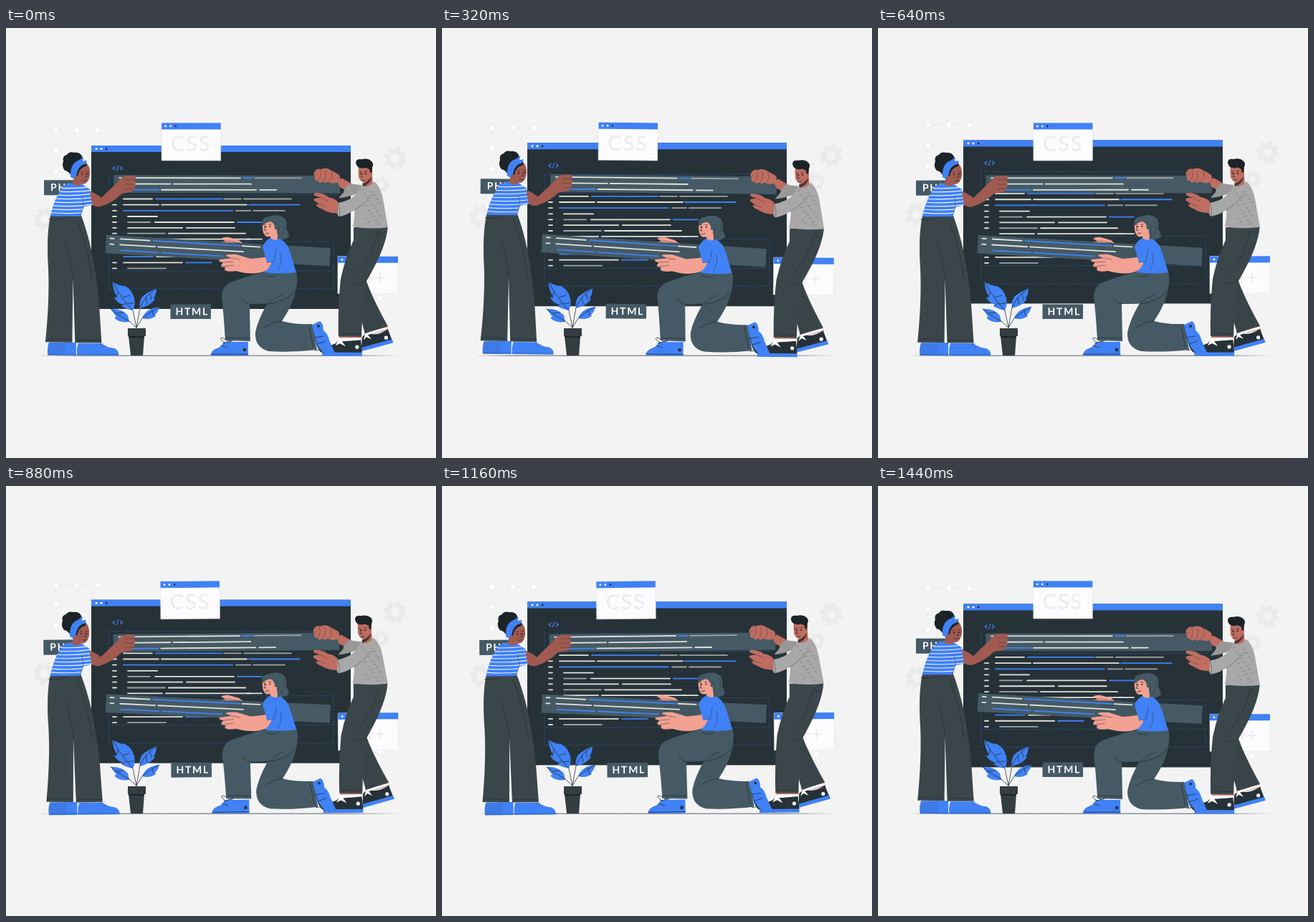
Animation of 600x600 px, one loop 1480 ms. Source, as an HTML page:

```html
<!DOCTYPE html>
<html lang="en">
<head>
<meta charset="utf-8">
<style>
html, body { margin: 0; height: 100%; overflow: hidden; background: #f3f3f3; }
svg { display: block; width: 100vw; height: 100vh; }
text { font-family: Lato, sans-serif; }
.blue { fill: #4081f5; }
.dark { fill: #263238; }
.slate { fill: #455a64; }
.pants { fill: #3b464b; }
.brown { fill: #a05a50; }
.tan { fill: #bf6d60; }
.pink { fill: #f2a192; }
.line { fill: none; stroke: #263238; stroke-width: .8; stroke-linecap: round; stroke-linejoin: round; }
.code { stroke-width: 1.8; stroke-linecap: round; }
.dash { fill: none; stroke: #4081f5; stroke-width: .8; stroke-dasharray: 2.2 2; opacity: .5; }
.tag { fill: #fff; font-weight: 700; font-size: 14px; letter-spacing: 1.7px; }
.ghost { fill: #ebebef; font-size: 29px; letter-spacing: 1.8px; }
</style>
</head>
<body>
<svg viewBox="0 0 600 600">
<defs>
  <clipPath id="shirt"><path d="M80 220Q94 214 106 218L118 226L121 247L108 250L104 263H62Q66 240 80 220Z"/></clipPath>
  <linearGradient id="fade"><stop offset="0" stop-color="#263238" stop-opacity=".1"/><stop offset=".1" stop-color="#263238"/><stop offset=".85" stop-color="#263238"/><stop offset="1" stop-color="#263238" stop-opacity="0"/></linearGradient>
  <g id="gear" fill="none" stroke="#eaeaea">
    <circle r="9.500" stroke-width="6.500"/>
    <circle r="14" stroke-width="4.500" stroke-dasharray="6 5"/>
  </g>
</defs>

<g id="back">
  <use href="#gear" x="543" y="181.500"/>
  <use href="#gear" transform="translate(523 218.500) scale(.72)"/>
  <use href="#gear" x="54" y="267"/>
  <path d="M70 200V143H128M522 345V377H500" fill="none" stroke="#ededed" stroke-width=".7"/>
  <g id="knobs" fill="#fff" stroke="#e9e9e9" stroke-width=".7"></g>
  <path class="dark" d="M119 164H481V392H119Z"/>
  <path class="blue" d="M119 164H481V173H119Z"/>
  <circle cx="126" cy="168.500" r="1.500" fill="#fff"/><circle cx="133" cy="168.500" r="1.500" fill="#fff"/><circle cx="140" cy="168.500" r="1.500" class="dark"/>
  <path d="M152.500 193L149 195.700L152.500 198.400M158.800 193L162.300 195.700L158.800 198.400M156.700 192L154.600 199.400" fill="none" stroke="#4081f5" stroke-width="1.200"/>
  <path class="dash" d="M143.500 208H460V233H143.500ZM143.500 298H457V364H143.500ZM143.500 339H457"/>
  <g id="page" class="code"></g>
</g>

<path d="M48 456.700H552V457.600H48Z" fill="url(#fade)"/>

<g id="front">
  <!-- floating windows and tags -->
  <g>
    <path d="M217 132.500H299.500V185H217Z" fill="#fcfcfe" stroke="#e4e4e4" stroke-width=".6"/>
    <path class="blue" d="M217 132.500H299.500V141.500H217Z"/>
    <circle cx="222.500" cy="137" r="1.400" fill="#fff"/><circle cx="229.500" cy="137" r="1.400" fill="#fff"/><circle cx="236.500" cy="137" r="1.400" class="dark"/>
    <text class="ghost" x="230" y="171.500">CSS</text>
    <path d="M463 318.500H547V370.500H463Z" fill="#fcfcfe" stroke="#e4e4e4" stroke-width=".6"/>
    <path class="blue" d="M463 318.500H547V327.500H463Z"/>
    <circle cx="469" cy="323" r="1.400" fill="#fff"/>
    <text class="ghost" x="482" y="357" style="font-size:26px;letter-spacing:0">C++</text>
    <path class="slate" d="M53 212.500H105V233.500H53ZM229.500 385.500H286V406H229.500Z"/>
    <text class="tag" x="62" y="227.500">PHP</text>
    <text class="tag" x="236.500" y="400.500">HTML</text>
  </g>

  <!-- code strips -->
  <path class="slate" d="M150.500 205.500L466 206V230.500L150.500 230Z"/>
  <g id="strip" class="code"></g>
  <g transform="translate(140 289) rotate(3.250)">
    <path class="slate" d="M0 0H313.500V25.500H0Z"/>
    <path d="M170 0H250V25.500H170Z" class="dark" opacity=".1"/>
    <g id="slab" class="code"></g>
  </g>

  <!-- standing woman -->
  <g>
    <path class="blue" d="M60 439H98V457H58.500Q57 447 60 439Z"/>
    <path class="dark" opacity=".08" d="M60 439H83V457H58.500Q57 447 60 439Z"/>
    <path class="blue" d="M101 440H133Q140 446 151 447Q158 450 157 457H99.500Q98 448 101 440Z"/>
    <path class="line" opacity=".35" d="M59 455.500H157M130 442L136 440M134 445L140 443"/>
    <path class="pants" d="M62 262H105Q113 283 119 310Q127 350 130 385L133.500 439.500H96.500L93.500 350L92.500 439L55 438.500Q61 380 59 335Q56 290 62 262Z"/>
    <path class="line" d="M82 300Q92 325 93.500 350M60 267Q74 269 84 265M99 268Q113 300 120 350M58 434L91 435M98 435.500L133 436"/>
    <path class="blue" d="M80 220Q94 214 106 218L118 226L121 247L108 250L104 263H62Q66 240 80 220Z"/>
    <path id="stripes" clip-path="url(#shirt)" fill="none" stroke="#f0f4ff" stroke-width="1.100"/>
    <path class="line" opacity=".5" d="M106 235Q109 243 108 250L104 263"/>
    <path class="brown" d="M95 206L93 218Q99 223 106 218V210Z"/>
    <path class="brown" d="M117 228Q126 231 133 237L157 214Q160 208 168 206L179 206Q183 209 179 212Q183 214 180 218Q182 222 178 224Q178 229 173 229L162 231Q150 243 133 249Q124 251 120 246Z"/>
    <path class="line" opacity=".5" d="M179 212H167M180 218H167M178 224H167"/>
    <path d="M82 199Q77 193 80 186Q78 179 85 177Q88 172 95 174Q103 173 106 179Q108 184 104 189L95 203L91 207Q88 200 82 199Z" fill="#1c2427"/>
    <path class="brown" d="M98 197Q103 189 112 189Q118 194 117 206Q115 217 108 218Q99 218 96 208Z"/>
    <path d="M96 207Q95 195 104 190L112 188Q114 193 109 194Q101 197 100 208Z" fill="#1c2427"/>
    <path class="blue" d="M90 208Q89 193 97 187Q104 184 108 180L107 186L113 185L111 190Q100 192 98 207L95 211Z"/>
    <circle class="brown" cx="98.500" cy="209" r="2.800"/>
    <path class="line" d="M104 201.500H107M112 200.500H115M111 203L113 208L110 208.500M107.500 213Q110 214 113 212.500"/>
    <circle cx="106" cy="204.500" r=".9"/><circle cx="114" cy="204" r=".8"/>
  </g>

  <!-- man -->
  <g>
    <path class="tan" d="M462 214L468 209L486 219L480 229L466 222Z"/>
    <path d="M497 219L479 217Q472 222 471 229L464 237Q478 236 492 230Z" fill="#989898"/>
    <path class="tan" d="M431 200Q434 195 440 197Q446 194 453 198L464 204Q468 208 464 214Q458 219 449 214Q446 218 442 214Q438 218 435 213Q430 214 431 208Q428 204 431 200Z"/>
    <path class="line" opacity=".5" d="M438 198Q441 205 437 212M446 199Q448 206 444 213M431 206L434 204M454 200Q457 209 452 213"/>
    <path class="tan" d="M498 211V221Q505 226 512 217L511 206Z"/>
    <!-- back leg and shoe -->
    <path d="M500 422L531 414L534 421L501 429Z" class="tan"/>
    <path class="dark" d="M497 431L504 425Q517 431 533 420L539 436L496 447Z"/>
    <path class="blue" d="M495 446L539 434L540.500 439L496 451Z"/>
    <path d="M502 424L532 417L533 420L505 428L510 434L503 431L499 435Z" fill="#fff"/>
    <circle cx="530.500" cy="432" r="2.600" fill="#fff"/>
    <path class="pants" d="M486 278H532.500Q530 306 503 353Q511 376 533 416L501 426L482 358Z"/>
    <path d="M503 353Q512 380 526 412L501 426L496 370Z" class="dark" opacity=".1"/>
    <!-- front leg and shoe -->
    <path d="M465 429H496V435H465Z" class="tan"/>
    <path class="dark" d="M460 440L466 433Q482 439 495 433L497 453H443Q447 444 460 440Z"/>
    <path class="blue" d="M442 452.500H497V457.500H441Z"/>
    <path d="M465 432H496V435L469 437L474 444L466 440L460 443Z" fill="#fff"/>
    <circle cx="490" cy="445" r="2.600" fill="#fff"/>
    <path class="pants" d="M485 278H532.500Q530 308 503 352Q497 390 496 430.500L464 430Q463 388 467 350Q474 318 485 296Z"/>
    <path class="line" d="M503 352Q493 358 487 356M519 284Q512 318 489 344M466 426L496 427M520 284Q522 290 528 291"/>
    <!-- jumper, near arm, head -->
    <path d="M497 220Q506 224 514 214Q523 222 526 238L533 278Q508 281 484 277Q487 262 486 254Q476 261 464 263Q457 252 463 244Q479 241 487 233Z" fill="#a8a8a8"/>
    <path id="spots" fill="none" stroke="#8f8f8f" stroke-width="1.500" stroke-linecap="round"/>
    <path class="line" opacity=".5" d="M486 254Q500 246 511 232M463 244Q467 252 465 262"/>
    <path class="tan" d="M463 242Q456 236 450 236Q444 230 431 230Q427 233 434 235L440 237Q430 236 429 240L437 246L433 246Q433 250 440 252Q450 259 463 258Z"/>
    <path class="line" opacity=".5" d="M440 237L450 242M437 246L446 249"/>
    <path class="tan" d="M491.500 195Q500 190 511 195Q512 209 506 215Q496 218 492 208Z"/>
    <path d="M488 188Q488 182 496 183Q505 181 509 185Q514 188 511 194L510 203L508 203L507 197L502 194.500Q490 198 488 188Z" fill="#1c2427"/>
    <path d="M497 217Q504 216 510 207Q510 217 498 221Z" fill="#1c2427" opacity=".75"/>
    <circle class="tan" cx="509" cy="204" r="2.400"/>
    <path class="line" d="M493 200.500H496M500 200.500L504 199.500M497 203L495 208H498M496 212Q499 213 501 212"/>
    <circle cx="495.500" cy="203" r=".9"/><circle cx="502" cy="203" r=".9"/>
  </g>

  <!-- kneeling woman -->
  <g>
    <path class="pink" d="M300 294Q304 291 311 292L325 296L330 300L300 299L306 297Z"/>
    <path class="line" opacity=".6" d="M302 299L310 297L327 300"/>
    <path class="blue" d="M425 415L438 409Q443 412 443 422Q449 426 451 435L459 453L455 457H446L434 445Z"/>
    <path d="M427 420L437 449L431 450M430 432L443 430M434 441L446 437" class="line"/>
    <path class="dark" d="M438 451L434 442L444 455Z"/>
    <circle cx="436" cy="416" r="2" class="dark"/>
    <path class="slate" d="M406 342Q409 374 385 409Q404 414 427 413L434 449Q398 453 367 451Q347 446 348 425Q351 408 365 384L376 355Z"/>
    <path d="M365 384Q390 383 403 364Q398 389 385 409Q370 410 354 407Z" class="dark" opacity=".08"/>
    <path class="blue" d="M304 438H338V457H286Q286 450 294 447Q301 445 304 438Z"/>
    <path class="line" d="M286 455H338M300 443L309 446M303 440L315 436M304 438Q296 433 302 432L312 438L321 434"/>
    <circle cx="333" cy="449" r="2.400" class="dark"/>
    <path class="slate" d="M362 340H405Q410 360 393 376Q374 386 340 385L341 437L306 436Q304 400 301 375Q302 358 316 354Q341 345 362 340Z"/>
    <path class="line" d="M340 385Q333 384 329 377M404 367Q390 382 366 385Q374 376 386 372M362 345Q375 350 380 343M307 432L340 433M385 409Q370 411 360 418M423 416L429 446"/>
    <path class="slate" d="M358 274Q356 264 367 263Q380 258 389 266Q393 272 391 281Q395 286 395 291Q388 297 377 295Q368 290 367 275Z"/>
    <path class="pink" d="M369 287V296Q374 300 379 295L379 283Z"/>
    <path class="blue" d="M369 293Q375 298 382 294Q393 299 397 315L405 341Q384 344 361 341L367 322L358 305Q362 296 369 293Z"/>
    <path class="pink" d="M372 318Q357 321 341 322L322 316Q306 315 307 318L315 321L298 323Q295 326 303 327L300 331Q300 334 306 334L305 337Q307 341 321 339Q345 346 362 339Q371 333 372 318Z"/>
    <path class="line" opacity=".6" d="M303 327L317 326M302 333L317 331M315 321L326 323"/>
    <path class="blue" d="M361 303Q372 298 377 309L374 326L364 327Q361 315 358 306Z"/>
    <path class="line" opacity=".55" d="M377 309L374 326L364 327M383 315Q386 329 379 338"/>
    <path class="pink" d="M358 274Q364 267 376 270Q381 279 377 287Q371 292 363 291Q357 287 358 274Z"/>
    <path class="slate" d="M357 276Q360 263 373 263Q389 264 389 278Q391 292 379 293Q379 283 375 281Q376 273 369 270Q363 271 357 276Z"/>
    <path d="M388 270Q392 284 379 294M376 272Q383 277 380 288" class="line" opacity=".5"/>
    <circle class="pink" cx="376" cy="283" r="2.200"/>
    <path class="line" d="M359 274.500L362 274M367 274L370 274M363 277L360 282L363 282.500M362 287Q364 287.500 367 286"/>
    <circle cx="361.500" cy="277" r=".9"/><circle cx="368.500" cy="277" r=".9"/>
  </g>
</g>

<!-- plant -->
<g>
  <path class="blue" d="M148.500 354Q158 360 166 360Q176 365 179 377Q181 387 177 394Q167 392 161 388L163 386Q154 383 151 376L155 375Q149 366 148.500 354ZM210 363Q210 372 206 377L208 378Q203 387 187 391Q185 383 190 375Q197 369 210 363ZM146 392Q162 391 170 401L172 410Q157 412 151 404L154 403ZM214 389Q212 397 208 400L209 402Q201 408 190 405Q195 391 214 389Z"/>
  <path d="M177 394Q182 405 182 419Q182 402 187 390M172 409Q180 411 182 419Q184 409 190 405" fill="none" stroke="#f8f8f8" stroke-width="1.200"/>
  <path class="line" d="M149 354Q160 377 177 394L182 418M156 368L154 377M163 376L173 373M168 383L162 388M169 385L178 384M210 363Q194 374 187 390L182 418M201 370L203 379M195 376L197 385M146 392Q157 402 172 409L182 418M155 398L164 397M214 389Q202 395 190 405L182 418M204 394L206 401"/>
  <path fill="#343d41" d="M170 419H195V430H193L191 457H174L171 430H170Z"/>
  <path d="M171 430H193V432H171Z" fill="#1c2427"/>
</g>
</svg>

<script>
const el = id => document.getElementById(id);
const colors = { w: "#e2e2dc", g: "#a0a3a2", b: "#4081f5" };

// Each row reads "y: <colour><from>-<to> ..."
function drawCode(id, rows) {
  for (const row of rows) {
    const [y, parts] = row.split(":");
    for (const part of parts.trim().split(" ")) {
      const [from, to] = part.slice(1).split("-");
      el(id).innerHTML += `<path d="M${from} ${y}H${to}" stroke="${colors[part[0]]}"/>`;
    }
  }
}

drawCode("page", [
  "238.5: w164-204 b209-301 g304-328 g332-398",
  "246.7: w149-154 w164-213 w217-336 b339-410",
  "254.9: w149-154 b164-316 g321-341 g345-389",
  "263: w149-154 w170-211",
  "271: w149-154 g170-201 w208-318 b323-357",
  "278.8: w149-154 w170-246 w252-319",
  "286.7: w149-154 g170-222 w227-334",
  "294.6: w170-218 w223-341 w336-357",
  "319.2: b164-205 w210-240",
  "327.3: w149-154 w164-246 b251-287",
  "335.4: w149-154 g170-223"
]);
drawCode("strip", [
  "209.3: w158-327 b331-344 g347-412",
  "217.6: w166-230 w234-342",
  "225.8: b172-213 w217-349 w354-377"
]);
drawCode("slab", [
  "4.3: w6-11 w20-61 b66-187 w190-215",
  "12.3: w6-11 w20-69 w73-192",
  "20.2: b22-74 b79-163"
]);

for (const [x, y] of [[70, 143], [99, 143], [128, 143], [70, 171], [70, 200], [522, 377]])
  el("knobs").innerHTML += `<path d="M${x - 3.3} ${y - 3.3}h6.6v6.6h-6.6z"/>`;

let stripes = "", spots = "";
for (let y = 222; y < 262; y += 5) stripes += `M55 ${y}Q90 ${y + 4} 125 ${y - 1}`;
for (let i = 0; i < 20; i++) {
  const y = 226 + i * 2.5, x = 496 + i * 0.3 + i * 13 % 23;
  spots += `M${x} ${y}l${2 + i % 2} ${i % 3 - 1}`;
}
el("stripes").setAttribute("d", stripes);
el("spots").setAttribute("d", spots);

const LOOP = 1480, TURN = 690, STEP = 40;
function frame() {
  // The swing begins one step before the loop does.
  const t = (Math.floor(performance.now() % LOOP / STEP) + 1) * STEP % LOOP;
  const rising = t < TURN;
  const phase = rising ? t / TURN : (t - TURN) / (LOOP - TURN);
  const lift = 8 * (rising ? phase : 1 - phase) - 0.45;
  const tilt = 0.6 * Math.sin(Math.PI * phase) * (rising ? 1 : -1) - 0.06;
  el("back").setAttribute("transform", `translate(0 ${-lift})`);
  el("front").setAttribute("transform", `rotate(${tilt} 300 300)`);
  requestAnimationFrame(frame);
}
frame();
</script>
</body>
</html>
```
